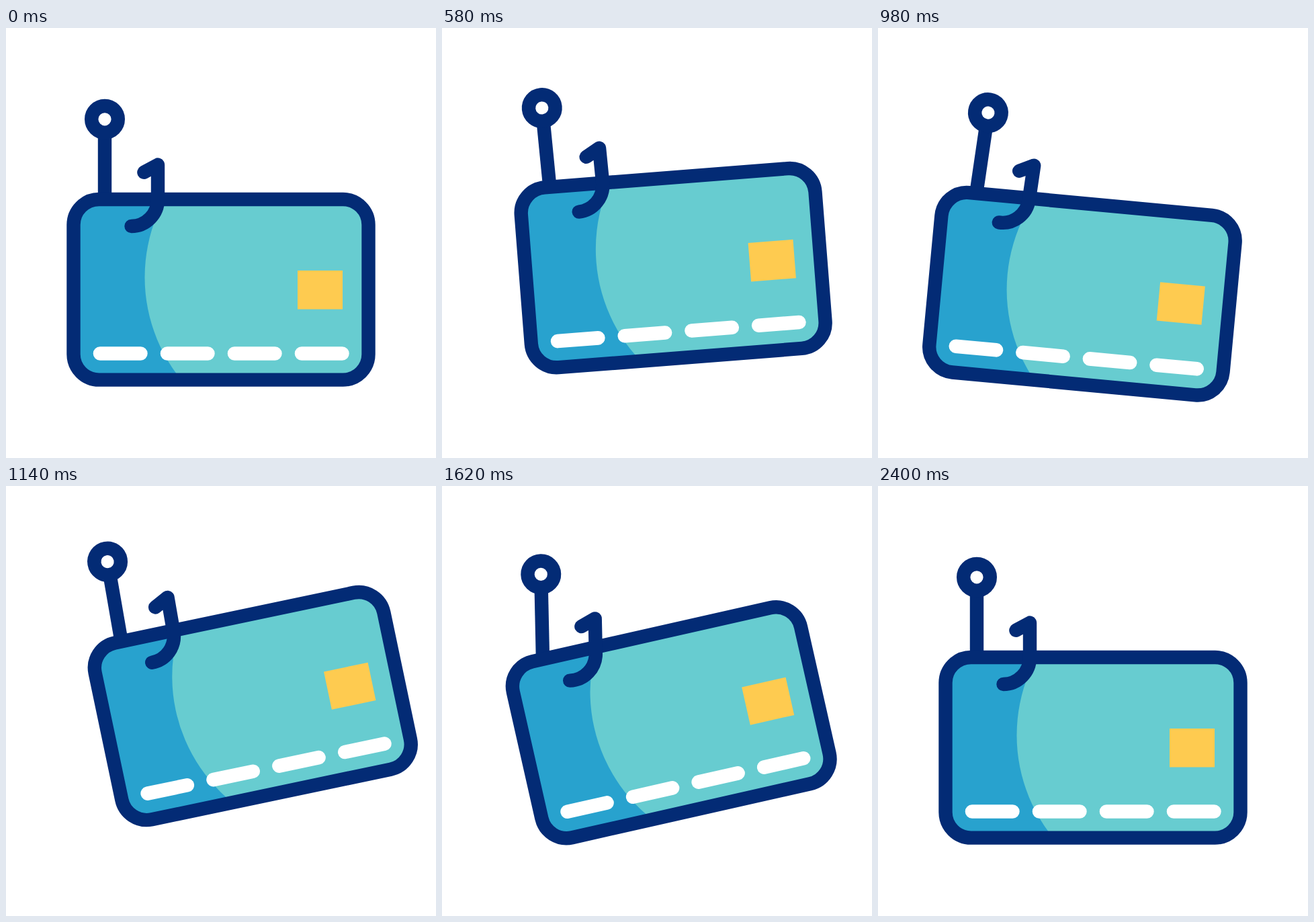
These frames come from a looping animation (640 by 640 pixels, 2.42 s). An HTML page:

```html
<!DOCTYPE html>
<html lang="en">
<head>
<meta charset="utf-8">
<title>Hooked card</title>
<style>
  html, body { margin: 0; width: 100%; height: 100%; overflow: hidden; background: #fff; }
  svg { display: block; width: 100vw; height: 100vh; }
  .line { fill: none; stroke: #032b75; stroke-width: 20.4; stroke-linecap: round; stroke-linejoin: round; }
</style>
</head>
<body>
<svg viewBox="0 0 640 640">
  <defs>
    <clipPath id="face"><rect x="100.5" y="255" width="439" height="268.6" rx="38"/></clipPath>
  </defs>
  <g id="shaft" class="line">
    <path d="M147 156V270" stroke-linecap="butt"/>
    <circle cx="147" cy="135.8" r="19.8" fill="#fff"/>
  </g>
  <g id="card">
    <g clip-path="url(#face)">
      <rect x="90" y="245" width="460" height="290" fill="#28a2ce"/>
      <circle cx="448" cy="371" r="241.5" fill="#67ccd0"/>
    </g>
    <rect x="434" y="361" width="67" height="57.6" fill="#fecb50"/>
    <path d="M140 484.5H500.4" stroke="#fff" stroke-width="20.6" stroke-linecap="round" stroke-dasharray="60.4 39.6"/>
    <rect class="line" x="100.5" y="255" width="439" height="268.6" rx="38"/>
  </g>
  <path id="barb" class="line" d="M205.4 214.8L226 203.6V255A39.5 40 0 0 1 186.5 295"/>
</svg>
<script>
  const LOOP = 2420, STEP = 20;
  const RING = { x: 147, y: 135.8 }, TIP = { x: 186.5, y: 295 };
  const REACH = Math.hypot(TIP.x - RING.x, TIP.y - RING.y);
  const LEAN = Math.atan2(TIP.y - RING.y, TIP.x - RING.x);

  const [shaft, barb, card] = ['shaft', 'barb', 'card'].map(id => document.getElementById(id));

  // Eased progress from 0 to 1 between two times.
  function glide(t, from, to) {
    const u = Math.min(1, Math.max(0, (t - from) / (to - from)));
    return (1 - Math.cos(Math.PI * u)) / 2;
  }

  // Move the pivot to p and turn around it.
  const place = (p, angle, pivot) =>
    `translate(${p.x} ${p.y}) rotate(${angle}) translate(${-pivot.x} ${-pivot.y})`;

  function draw(t) {
    // Shared beats: dip, yank up, drop, second yank, settle.
    const dip = glide(t, 0, 118);
    const yank = glide(t, 118, 422);
    const drop = glide(t, 422, 800);
    const tug = glide(t, 800, 1230);
    const lower = glide(t, 1230, 1766);

    const ring = {
      x: RING.x - 12.7 * yank + 38.8 * drop - 24.6 * tug - 1.5 * lower,
      y: RING.y + 4.8 * dip - 31.6 * yank + 26.8 * drop - 25.9 * tug + 25.9 * lower
    };
    const swing = -21.7 * yank + 43.1 * drop - 34.9 * tug
      + 17.4 * glide(t, 1230, 1845) - 3.9 * glide(t, 1845, 2400);
    // The card trails the hook in the later swings.
    const tilt = -16.8 * yank + 33.1 * drop - 34.3 * glide(t, 800, 1271)
      + 20.1 * glide(t, 1375, 2091) - 2.1 * glide(t, 2091, 2400);

    // The card hangs from the tip of the hook.
    const a = LEAN + swing * Math.PI / 180;
    const tip = { x: ring.x + REACH * Math.cos(a), y: ring.y + REACH * Math.sin(a) };

    for (const part of [shaft, barb]) part.setAttribute('transform', place(ring, swing, RING));
    card.setAttribute('transform', place(tip, tilt, TIP));
  }

  const start = performance.now();
  function tick() {
    const t = (performance.now() - start) % LOOP;
    draw(Math.floor(t / STEP) * STEP);
    requestAnimationFrame(tick);
  }
  draw(0);
  requestAnimationFrame(tick);
</script>
</body>
</html>
```
